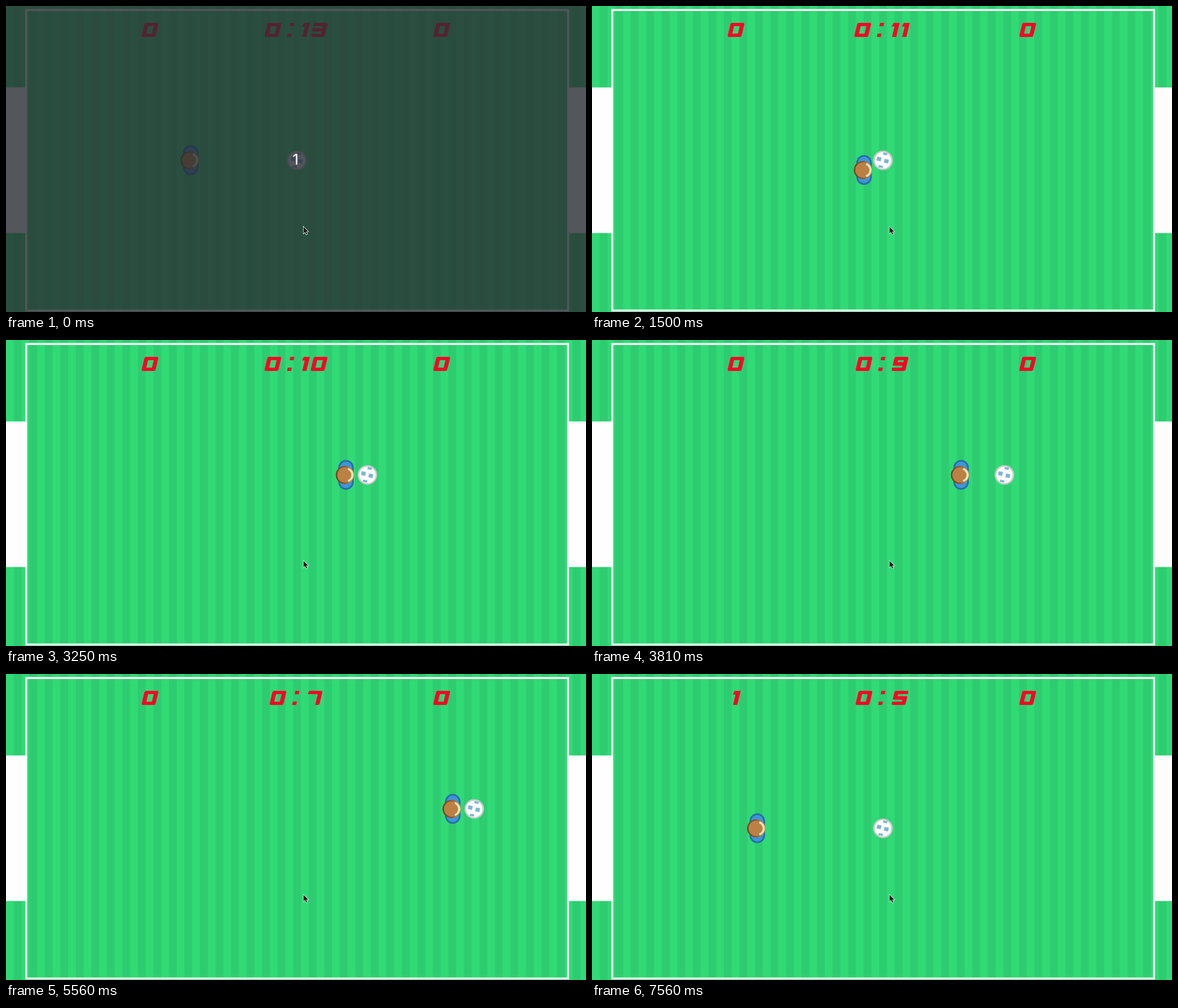
An HTML page with a canvas that plays this animation: 1029 px wide and 544 px high, repeating every 8 s.

```html
<!DOCTYPE html>
<html lang="en">
<head>
<meta charset="utf-8">
<title>Football match</title>
<style>
  html, body { margin: 0; width: 100%; height: 100%; overflow: hidden; background: #2ecc71; }
  canvas { display: block; }
</style>
</head>
<body>
<canvas id="stage" width="1029" height="544"></canvas>
<script>
const g = document.getElementById('stage').getContext('2d');
const LOOP = 8000, GOAL = 7000, STEP = 17.22;
const HOME = { x: 258.8, y: 274.2 }, SPOT = { x: 516.2, y: 274.4 };

// A held key repeats a step: first time (ms), interval, number of steps
const keys = {
  right: [[60, 180, 10], [2310, 173, 14], [4880, 180, 2], [5440, 135, 7], [6440, 250, 3]],
  down: [[500, 190, 2]],
  up: [[1250, 0, 1], [1880, 310, 3]]
};

// A kick: time (ms) and distance to the right; the first one also lifts the ball
const kicks = [[1630, 26], [2310, 56], [2880, 43], [3310, 90.5], [4190, 56],
  [4880, 43], [5560, 91], [6250, 56], [6880, 14]];
const FIRST_LIFT = 34.5;

const clamp = (v, lo, hi) => Math.max(lo, Math.min(hi, v));

function repeats(t, [start, every, times]) {
  return t < start ? 0 : every ? clamp(Math.floor((t - start) / every) + 1, 0, times) : 1;
}

const steps = (key, t) => keys[key].reduce((sum, run) => sum + repeats(t, run), 0);

function playerAt(t) {
  if (t >= GOAL) return [HOME.x + STEP * repeats(t, [7440, 120, 2]), HOME.y];
  return [HOME.x + STEP * (4 + steps('right', t)),
          HOME.y + STEP * (steps('down', t) - steps('up', t))];
}

// The ball slows down evenly over six ticks after a kick
function rolled(t, start) {
  const left = 6 - clamp(Math.floor((t - start + 5) / 62.5), 0, 6);
  return 1 - left * (left + 1) / 42;
}

function ballAt(t) {
  if (t >= GOAL) return [SPOT.x, SPOT.y];
  const x = kicks.reduce((sum, [start, far]) => sum + far * rolled(t, start), SPOT.x);
  return [x, SPOT.y - FIRST_LIFT * rolled(t, kicks[0][0])];
}

const secondsLeft = t => 13 - Math.floor((t + 740) / 1000);

function rect(color, x, y, w, h) {
  g.fillStyle = color;
  g.fillRect(x, y, w, h);
}

function disc(color, x, y, r) {
  g.fillStyle = color;
  g.beginPath();
  g.arc(x, y, r, 0, 2 * Math.PI);
  g.fill();
}

function poly(...points) {
  g.beginPath();
  for (const [x, y] of points) g.lineTo(x, y);
  g.closePath();
}

// Runs a drawing with its own origin
function at(x, y, paint) {
  g.save();
  g.translate(x, y);
  paint();
  g.restore();
}

function drawField() {
  const stripe = 13.77;
  rect('#30da75', 0, 0, 1029, 544);
  for (let x = stripe; x < 1029; x += 2 * stripe) rect('#2ecc71', x, 0, stripe, 544);
  for (const x of [0, 998]) rect('#fefefe', x, 144.8, 35, 258.8);
  g.strokeStyle = '#fefefe';
  g.lineWidth = 3.4;
  g.strokeRect(35.9, 7.1, 961.3, 534.2);
}

// Digits are slanted segments inside a rounded box: bars T M B, sides l L r R
const SIZE = 25, BAR = 5.8, SIDE = 7.5;
const digits = ['TBlLrR', '', 'TrMLB', 'TMBrR', 'lMrR', 'TlMRB', 'TlMLRB', 'TrR', 'TMBlLrR', 'TMBlrR'];

function addSegment(s) {
  const bar = 'TMB'.indexOf(s), half = SIZE * 0.6;
  if (bar >= 0) g.rect(0, bar * (SIZE - BAR) / 2, SIZE, BAR);
  else g.rect('lL'.includes(s) ? 0 : SIZE - SIDE, 'lr'.includes(s) ? 0 : SIZE - half, SIDE, half);
}

function drawGlyph(c, x) {
  at(x + 6, 30, () => {
    g.transform(1, 0, -0.24, 1, 0, 0);
    g.fillStyle = '#ff0026';
    if (c === ':') {
      for (const y of [0, SIZE - 6]) g.fillRect(-0.5, y, 7.2, 6);
    } else if (c === '1') {
      poly([0.5, 0], [11, 0], [11, SIZE], [3.5, SIZE], [3.5, 6.5], [-1.5, 6.5]);
      g.fill();
    } else {
      g.beginPath();
      g.roundRect(0, 0, SIZE, SIZE, 3);
      g.clip();
      g.beginPath();
      [...digits[c]].forEach(addSegment);
      g.fill();
    }
  });
}

function drawNumber(text, center) {
  const advance = c => c === ':' ? 23 : c === '1' ? 18 : 41;
  const width = text.endsWith('1') ? 17.5 : 31;
  const before = [...text.slice(0, -1)].reduce((sum, c) => sum + advance(c), 0);
  let x = center - (before + width) / 2;
  for (const c of text) {
    drawGlyph(c, x);
    x += advance(c);
  }
}

function drawPlayer(x, y) {
  at(x, y, () => {
    g.fillStyle = '#3f95d8';
    g.strokeStyle = '#246ea8';
    g.lineWidth = 3;
    g.beginPath();
    g.roundRect(-12.2, -25, 24.4, 50, 12.2);
    g.fill();
    g.stroke();

    const rim = g.createLinearGradient(-18, 0, 14, 0);
    rim.addColorStop(0, '#6f4320');
    rim.addColorStop(0.5, '#8c5c2e');
    rim.addColorStop(1, '#c99c60');
    disc(rim, -2, 0.2, 16.2);
    disc('#bb8044', -2, 0.2, 13.6);
    g.strokeStyle = '#f8e2b8';
    g.lineWidth = 3.6;
    g.beginPath();
    g.arc(0, 0.2, 11.4, -1.25, 1.25);
    g.stroke();
  });
}

function drawBall(x, y) {
  at(x, y, () => {
    disc('#c6cbca', 0, 0, 17.4);
    disc('#fcfdfd', 0, 0, 14.6);
    g.fillStyle = '#7fb5d3';
    for (const [px, py, h] of [[-7, -2.5, 7], [6, 1.5, 7], [4, -11.5, 4], [-4, 11, 4]]) {
      at(px, py, () => {
        g.rotate(0.2);
        g.fillRect(-3.8, -h / 2, 7.6, h);
      });
    }
  });
}

function drawCursor() {
  at(527.8, 392.5, () => {
    g.scale(0.9, 0.9);
    poly([0, 0], [0, 13.2], [3, 10.4], [5.2, 15.4], [7.4, 14.4], [5.3, 9.6], [9.2, 9.4]);
    g.lineWidth = 1.6;
    g.strokeStyle = '#fff';
    g.stroke();
    g.fillStyle = '#1b1b1b';
    g.fill();
  });
}

function drawCountdown() {
  rect('rgba(40,44,51,.8)', 0, 0, 1029, 544);
  g.fillStyle = '#fff';
  g.font = '26px Inter, sans-serif';
  g.textAlign = 'center';
  g.fillText('1', 513.8, 281.5);
}

function draw(t) {
  drawField();
  drawNumber(t < GOAL ? '0' : '1', 255.5);
  drawNumber('0:' + secondsLeft(t), 514.5);
  drawNumber('0', 773);
  drawPlayer(...playerAt(t));
  drawBall(...ballAt(t));
  if (t < 60) drawCountdown();
  drawCursor();
}

const began = performance.now();
function tick() {
  draw((performance.now() - began) % LOOP);
  requestAnimationFrame(tick);
}
tick();
</script>
</body>
</html>
```
